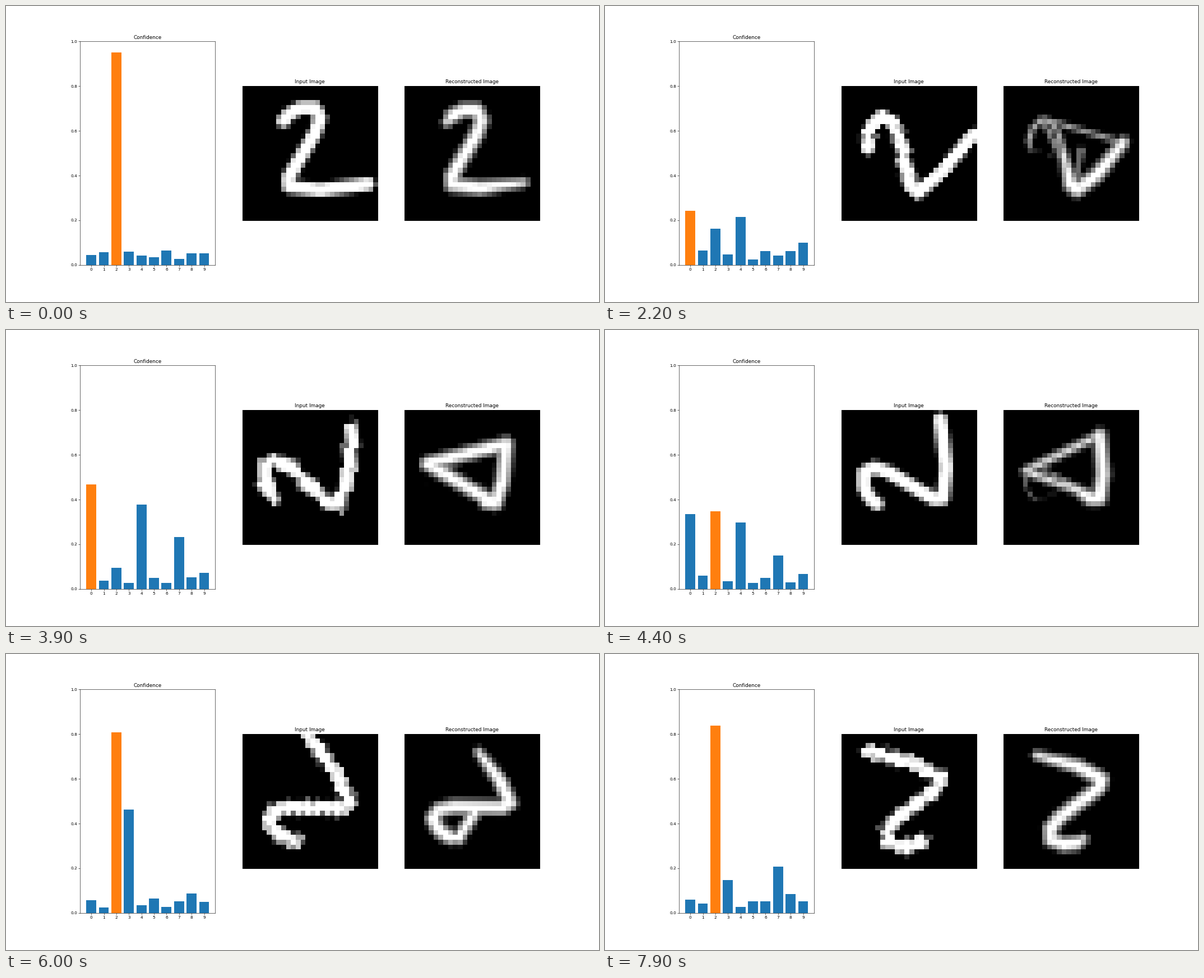
These frames come from a looping animation (1058 px wide and 529 px high, 8 s). A matplotlib script:

```python
import numpy as np
import matplotlib.pyplot as plt
from matplotlib.animation import FuncAnimation

N = 28            # image side in cells
FRAMES = 80
STEP = 100        # ms per frame
TURN = 2          # degrees per frame
BLUE, ORANGE = "#1f77b4", "#ff7f0e"

plt.rcParams["font.family"] = "DejaVu Sans"
centre = np.arange(N) + 0.5
GX, GY = np.meshgrid(centre, centre)

# Handwritten "2" in cells: hook, stem, corner, tail.
TWO = np.array([(8.5, 7.3), (9.6, 5.9), (12, 4.6), (15, 4.6), (16, 6.8),
                (15, 9.8), (9.5, 19), (9.6, 20.9), (16, 21.6), (26, 20.4)])
TOP, CORNER, TAIL = 3, 7, 9


def bump(t, mid, width, power=2):
    return np.exp(-abs((t - mid) / width) ** power)


def draw_stroke(points, widths, soft):
    """Paint a polyline with soft edges; thin parts come out dim."""
    img = np.zeros((N, N))
    for (x0, y0), (x1, y1), w0, w1 in zip(points, points[1:],
                                          widths, widths[1:]):
        dx, dy = x1 - x0, y1 - y0
        t = ((GX - x0) * dx + (GY - y0) * dy) / (dx * dx + dy * dy + 1e-9)
        t = t.clip(0, 1)
        dist = np.hypot(GX - x0 - t * dx, GY - y0 - t * dy)
        img = np.maximum(img, (w0 + t * (w1 - w0) - dist) / soft)
    return img.clip(0, 1)


def turn(x, y, degrees):
    """Counter-clockwise on screen, where y points down."""
    a = np.radians(degrees)
    return (x * np.cos(a) + y * np.sin(a), y * np.cos(a) - x * np.sin(a))


def rotate(img, degrees):
    x, y = turn(GX - N / 2, GY - N / 2, -degrees)
    col = np.floor(x + N / 2 + 1e-9).astype(int)
    row = np.floor(y + N / 2 + 1e-9).astype(int)
    inside = (col >= 0) & (col < N) & (row >= 0) & (row < N)
    return np.where(inside, img[row.clip(0, N - 1), col.clip(0, N - 1)], 0)


def zero_like(t):
    return bump(t, 34, 13, 4)


def three_like(t):
    return bump(t, 66, 9)


def confidence(t):
    c = np.arange(10)
    h = 0.045 + 0.02 * np.sin(0.25 * t + 2.4 * c)
    h[0] += 0.44 * zero_like(t)
    h[4] += 0.33 * zero_like(t)
    h[3] += 0.66 * three_like(t)
    h[7] += 0.17 * bump(t, 38, 8) + 0.18 * bump(t, 79, 6)
    h[8] += 0.07 * bump(t, 30, 8) + 0.34 * bump(t, 69, 6)
    h[9] += 0.1 * bump(t, 30, 8) + 0.08 * bump(t, 69, 8)
    h[2] = 0.95 - 0.9 * bump(t, 31.5, 15.7, 4) - 0.385 * bump(t, 69, 9)
    return h


def reconstruct(t):
    """Soft copy of the turned digit that closes into a loop or a zero."""
    zero, three = zero_like(t), three_like(t)
    loop = max(0.6 * bump(t, 13, 8), bump(t, 59, 13, 4))
    size, soft = 2.2, 1.7

    base = TWO.copy()
    pull = 0.95 - 0.15 * zero - 0.25 * three
    base[CORNER + 1:] = base[CORNER] + pull * (base[CORNER + 1:] - base[CORNER])
    x, y = turn(*(0.95 * (base - N / 2)).T, TURN * t)
    path = np.column_stack([x - 0.8 * zero, y]) + N / 2

    widths = np.full(len(path), size)
    widths[:CORNER - 1] *= 1 - zero
    widths[0] *= 0.75
    widths[TAIL] *= 0.75 + 0.25 * zero
    img = draw_stroke(path, widths, soft)

    def add(points, *w):
        return np.maximum(img, draw_stroke(points, w, soft))

    stem = (path[5] + path[6]) / 2
    img = add([path[0], stem], size * loop * 0.9, size * loop * 0.9)
    ring = path[[CORNER, TOP, TAIL]]
    img = add(ring, *[size * zero] * 3)
    fill = bump(t, 28, 6)
    img = add([ring.mean(axis=0), path[CORNER]], 3.2 * fill, fill)
    return img


digit = draw_stroke(TWO, np.full(len(TWO), 1.85), 1)

fig, (chart, left, right) = plt.subplots(1, 3, figsize=(20, 10), dpi=52.9)
fig.subplots_adjust(left=.125, right=.9, bottom=.125, top=.88, wspace=.2)

chart.set_title("Confidence")
bars = chart.bar(range(10), confidence(0), color=BLUE)
chart.set_xticks(range(10))
chart.set_xlim(-.89, 9.89)
chart.set_ylim(0, 1)


def image_panel(ax, title):
    ax.set_title(title)
    ax.axis("off")
    return ax.imshow(np.zeros((N, N)), cmap="gray", vmin=0, vmax=1,
                     interpolation="nearest")


input_im = image_panel(left, "Input Image")
recon_im = image_panel(right, "Reconstructed Image")


def update(frame):
    if frame == 45:      # the motion rests here for one beat
        frame = 44
    heights = confidence(frame)
    best = heights.argmax()
    for i, bar in enumerate(bars):
        bar.set_height(heights[i])
        bar.set_facecolor(ORANGE if i == best else BLUE)
    input_im.set_data(rotate(digit, TURN * frame))
    recon_im.set_data(reconstruct(frame))
    return [*bars, input_im, recon_im]


anim = FuncAnimation(fig, update, frames=FRAMES, interval=STEP,
                     repeat=True, repeat_delay=0, blit=False)
plt.show()
```
